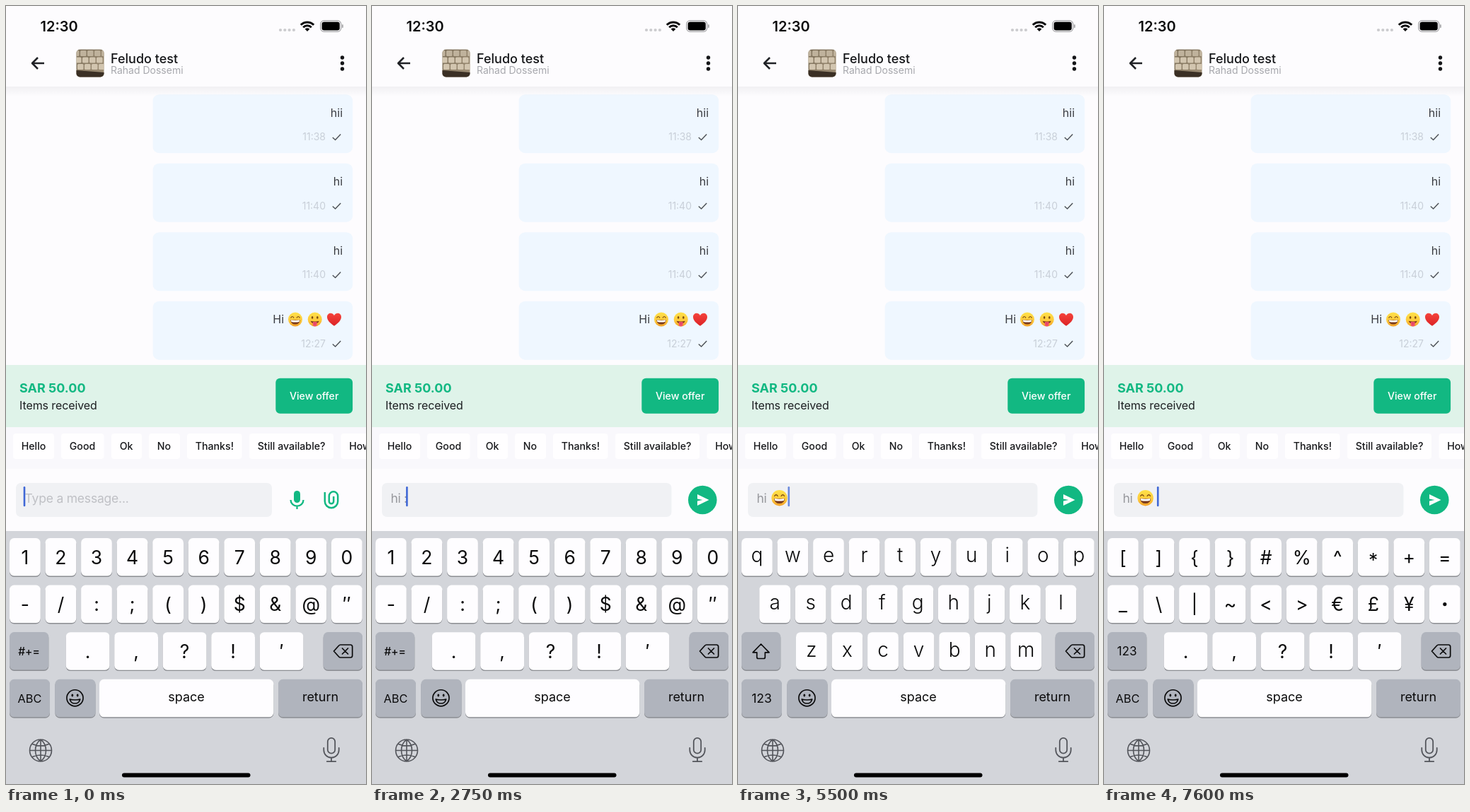
Write an HTML page with a canvas that moves like this. It is 509x1101 px and loops after 8000 ms.

```html
<!DOCTYPE html>
<html lang="en">
<head>
<meta charset="utf-8">
<title>Chat</title>
<style>
html, body { margin: 0; width: 100%; height: 100%; overflow: hidden; background: #fdfcfe; }
canvas { display: block; width: 509px; height: 1101px; }
</style>
</head>
<body>
<canvas id="stage"></canvas>
<script>
const W = 509, H = 1101, LOOP = 8000, STEP = 50;
const GREEN = '#12b882', PAPER = '#fdfcfe', GREY_KEY = '#b0b4bd', BLACK = '#0b0b0c';
const canvas = document.getElementById('stage');
const dpr = window.devicePixelRatio || 1;
canvas.width = W * dpr;
canvas.height = H * dpr;
const c = canvas.getContext('2d');

// Timeline: each entry holds from its time on.
const DRAFT = [[0, ''], [350, 'hi '], [2700, 'hi :'], [5000, 'hi ☺'], [5800, 'hi ☺ ']];
const LAYOUT = [[0, 'digits'], [3550, 'lower'], [4200, 'upper'], [5000, 'lower'], [6200, 'digits'], [7500, 'symbols']];
const PRESSED = [[0, ''], [2500, ':'], [2700, ''], [4800, 'D'], [5000, ''], [5650, 'space'], [5800, '']];
// time, target opacity, fade length
const CARET = [
  [0, 1, 50], [700, 0, 200], [1150, 1, 150], [1700, 0, 200], [2050, 1, 200],
  [3200, 0, 200], [3500, 1, 100], [4150, 0, 200], [4200, 1, 50], [4800, 0, 200],
  [5000, 1, 50], [5500, 0, 200], [5800, 1, 50], [6800, 0, 200], [7100, 1, 200]
];
const CARET_X = { '': 26, 'hi ': 44.6, 'hi :': 49.4, 'hi ☺': 71.8, 'hi ☺ ': 76.2 };
const ROWS = {
  digits: ['1234567890', '-/:;()$&@″', '.,?!′'],
  symbols: ['[]{}#%^*+=', '_\\|~<>€£¥•', '.,?!′'],
  lower: ['qwertyuiop', 'asdfghjkl', 'zxcvbnm'],
  upper: ['QWERTYUIOP', 'ASDFGHJKL', 'ZXCVBNM']
};

const entry = (list, t) => list.filter(e => e[0] <= t).pop();
const at = (list, t) => entry(list, t)[1];
const ease = k => k * k * (3 - 2 * k);

function text(s, x, y, size, color, { weight = 400, align = 'left', spacing = 0 } = {}) {
  c.font = `${weight} ${size}px Inter, "Liberation Sans", sans-serif`;
  c.letterSpacing = spacing + 'px';
  c.textAlign = align;
  c.fillStyle = color;
  c.fillText(s, x, y);
}

function box(x, y, w, h, r, color) {
  c.beginPath();
  c.roundRect(x, y, w, h, r);
  c.fillStyle = color;
  c.fill();
}

function disc(x, y, rx, color, ry = rx) {
  c.beginPath();
  c.ellipse(x, y, rx, ry, 0, 0, 7);
  c.fillStyle = color;
  c.fill();
}

function stroke(path, color, width, cap = 'round') {
  c.strokeStyle = color;
  c.lineWidth = width;
  c.lineCap = cap;
  c.lineJoin = 'round';
  c.stroke(new Path2D(path));
}

function fill(path, color) {
  c.fillStyle = color;
  c.fill(new Path2D(path));
}

function placed(x, y, scale, draw) {
  c.save();
  c.translate(x, y);
  c.scale(scale, scale);
  draw();
  c.restore();
}

// Emoji, drawn in a unit of radius 10
function faceBase() {
  const g = c.createLinearGradient(0, -10, 0, 10);
  g.addColorStop(0, '#ffe14a');
  g.addColorStop(0.6, '#fdc93a');
  g.addColorStop(1, '#f3a02b');
  disc(0, 0, 10, g);
}

function grin() {
  faceBase();
  stroke('M-6.2 -2.4Q-4.2 -5.6 -2.2 -2.4M2.2 -2.4Q4.2 -5.6 6.2 -2.4', '#7a4a12', 1.2);
  fill('M-6.8 .4Q0 1.6 6.8 .4Q6.2 7 0 7Q-6.2 7 -6.8 .4Z', '#7a3a1c');
  fill('M-6.3 .8Q0 2 6.3 .8L5.5 3.4Q0 4.4 -5.5 3.4Z', '#fff');
}

function tongue() {
  faceBase();
  disc(-3.6, -2.6, 1.3, '#7a4a12', 1.8);
  disc(3.6, -2.6, 1.3, '#7a4a12', 1.8);
  fill('M-6 2.2Q0 3.8 6 2.2Q4.6 6 0 6Q-4.6 6 -6 2.2Z', '#7a3a1c');
  box(-2.9, 3.6, 5.8, 6.2, [1, 1, 2.9, 2.9], '#f0506e');
  stroke('M0 4.4V7', '#c93553', 0.7);
}

function heart() {
  const g = c.createLinearGradient(0, -9, 0, 9);
  g.addColorStop(0, '#f5443c');
  g.addColorStop(1, '#dc2326');
  fill('M0 9.3C-7 4.5 -10 .8 -10 -3.4C-10 -9.6 -2.6 -10.8 0 -5.6C2.6 -10.8 10 -9.6 10 -3.4C10 .8 7 4.5 0 9.3Z', g);
}

function statusBar() {
  text('12:30', 48.5, 36, 20, BLACK, { weight: 600 });
  for (let i = 0; i < 4; i++) disc(388 + i * 6.3, 34, 2.1, '#cbcbce');
  for (const r of [13, 8.2]) {
    c.beginPath();
    c.arc(426, 36, r, -Math.PI * 0.75, -Math.PI * 0.25);
    c.strokeStyle = BLACK;
    c.lineWidth = 3;
    c.lineCap = 'butt';
    c.stroke();
  }
  fill('M426 36L422.6 32.6Q426 30 429.4 32.6Z', BLACK);
  c.beginPath();
  c.roundRect(444.7, 20.7, 29, 15.6, 5);
  c.strokeStyle = '#a6a6a9';
  c.lineWidth = 1.3;
  c.stroke();
  box(446.6, 22.6, 25.2, 11.8, 3.2, '#000');
  box(475, 26, 1.8, 5, 1, '#a6a6a9');
}

function avatar() {
  c.save();
  c.beginPath();
  c.roundRect(99.5, 61.5, 39, 39, 5);
  c.clip();
  const g = c.createLinearGradient(99, 61, 139, 101);
  g.addColorStop(0, '#786b55');
  g.addColorStop(1, '#a3937a');
  c.fillStyle = g;
  c.fillRect(99, 61, 40, 40);
  for (let row = 0; row < 3; row++) {
    for (let i = 0; i < 5; i++) box(95 + i * 10 + row * 3, 63 + row * 9.5, 8.6, 8, 1.5, row ? '#d2c5af' : '#bfb29c');
  }
  fill('M99 91L139 94V101H99Z', '#3a2f24');
  c.restore();
}

function header() {
  c.fillStyle = PAPER;
  c.fillRect(0, 0, W, 114);
  const g = c.createLinearGradient(0, 114, 0, 128);
  g.addColorStop(0, 'rgba(20,20,40,.05)');
  g.addColorStop(1, 'rgba(20,20,40,0)');
  c.fillStyle = g;
  c.fillRect(0, 114, W, 14);
  statusBar();
  stroke('M54 81H37.5M45 73L37 81L45 89', '#202226', 2.5, 'butt');
  avatar();
  text('Feludo test', 148, 81, 18, '#141518', { weight: 500 });
  text('Rahad Dossemi', 148, 96.3, 14, '#a7a8ad');
  for (const y of [73, 81, 89]) disc(475.5, y, 2.7, '#141518');
}

function messages() {
  const list = [['hii', '11:38'], ['hi', '11:40'], ['hi', '11:40'], ['Hi', '12:27']];
  list.forEach(([msg, time], i) => {
    const y = 125.2 + i * 97.5;
    const last = i === 3;
    box(207.6, y, 282.6, 83, 9, '#eff7ff');
    text(msg, last ? 393 : 476, y + 31.5, 16, '#3b3d42', { align: 'right' });
    text(time, 452, y + 65, 14, '#c8cfd8', { align: 'right' });
    placed(467.6, y + 60.2, 1, () => stroke('M-5.8 .6L-2 4.2L5.6 -4', '#4d5157', 1.4, 'butt'));
    if (last) {
      placed(409, y + 25.8, 1, grin);
      placed(436.7, y + 25.8, 1, tongue);
      placed(464, y + 25.8, 1, heart);
    }
  });
}

function offer() {
  c.fillStyle = '#dff3e9';
  c.fillRect(0, 508, W, 88);
  text('SAR 50.00', 19, 547, 18, GREEN, { weight: 700 });
  text('Items received', 19, 570.5, 16, '#1d1f22', { spacing: -0.1 });
  box(381.3, 526.7, 108.8, 50, 6, GREEN);
  text('View offer', 435.7, 556.5, 14.2, '#fff', { weight: 500, align: 'center' });
}

function chips() {
  c.fillStyle = '#f9f8fc';
  c.fillRect(0, 596, W, 59);
  const list = [['Hello', 10, 58], ['Good', 78, 60.5], ['Ok', 149, 43], ['No', 202, 44],
    ['Thanks!', 256, 77.5], ['Still available?', 344, 119], ['How', 473.5, 60]];
  for (const [label, x, w] of list) {
    box(x, 605, w, 36, 4, '#fffeff');
    text(label, x + 11.7, 628, 14.2, '#16171a', { weight: 450 });
  }
}

function composer(t, draft) {
  const k = ease(Math.max(0, Math.min(1, (t - 300) / 350)));
  c.fillStyle = PAPER;
  c.fillRect(0, 655, W, 88);
  box(14, 675, 362 + 47.5 * k, 48, 7, '#f0f1f4');

  c.globalAlpha = 1 - k;
  box(407, 686, 9, 17, 4.5, GREEN);
  stroke('M402.5 699A8.8 8.4 0 0 0 420.5 699M411.5 707.5V712', GREEN, 2.3, 'butt');
  stroke('M450.8 688V701A9.2 9.2 0 0 0 469.2 701V693.5A6.2 6.2 0 0 0 456.8 693.5V701A3.2 3.2 0 0 0 463.2 701V694', GREEN, 2.5, 'butt');
  c.globalAlpha = k;
  disc(467.3, 699, 20.3, GREEN);
  fill('M460 691L476.5 699L460 707V700.6L467.5 699L460 697.4Z', '#fff');
  c.globalAlpha = 1;

  if (!draft) {
    text('Type a message...', 26.5, 702.5, 17.5, '#bfc0c5', { spacing: -0.2 });
  } else {
    text(draft.replace('☺', ''), 26.5, 702.5, 17.5, '#96979c', { spacing: -0.3 });
    if (draft.includes('☺')) placed(58.6, 696.2, 1.12, grin);
  }

  const [start, target, length] = entry(CARET, t);
  const f = Math.min(1, (t - start + STEP) / length);
  c.globalAlpha = target ? f : 1 - f;
  box(CARET_X[draft] - 1.3, 680, 2.6, 28.3, 1.3, '#3f67d6');
  c.globalAlpha = 1;
}

function key(x, y, w, color = '#fefdff') {
  box(x, y + 1.4, w, 53.5, 6.5, '#8b8d92');
  box(x, y, w, 53.5, 6.5, color);
}

function glyph(ch, x, y, letters) {
  if (ch === '•') return disc(x, y + 27, 2.6, BLACK);
  const shift = ch === '*' ? 4 : 0;
  const lower = ch >= 'a' && ch <= 'z';
  text(ch, x, y + (letters ? 34.3 : 36.6) + shift, lower ? 28 : 26.5, BLACK,
    { align: 'center', weight: letters ? 300 : 400 });
}

// Enlarged label above a held key
function balloon({ ch, x, y, w }) {
  const l = x - 14, r = x + w + 14, top = y - 68, b = y + 53.5, e = x + w;
  c.save();
  c.shadowColor = 'rgba(0,0,0,.3)';
  c.shadowBlur = 5;
  fill(`M${l + 12} ${top}H${r - 12}Q${r} ${top} ${r} ${top + 12}V${y - 18}C${r} ${y - 4} ${e} ${y - 6} ${e} ${y + 10}` +
    `V${b - 6}Q${e} ${b} ${e - 6} ${b}H${x + 6}Q${x} ${b} ${x} ${b - 6}V${y + 10}C${x} ${y - 6} ${l} ${y - 4} ${l} ${y - 18}` +
    `V${top + 12}Q${l} ${top} ${l + 12} ${top}Z`, '#fefdff');
  c.restore();
  text(ch, x + w / 2, y - 22, 41, BLACK, { align: 'center', weight: 300 });
}

function smileyKey() {
  stroke('M-11 0A11 11 0 1 0 11 0A11 11 0 1 0 -11 0', BLACK, 1.6);
  disc(-3.5, -3.6, 1.3, BLACK, 2);
  disc(3.5, -3.6, 1.3, BLACK, 2);
  stroke('M-7 1.6Q0 3.4 7 1.6Q5.6 7.4 0 7.4Q-5.6 7.4 -7 1.6Z', BLACK, 1.4);
}

function dock() {
  placed(49, 1053.5, 1, () => {
    stroke('M-15.5 0A15.5 15.5 0 1 0 15.5 0A15.5 15.5 0 1 0 -15.5 0M0 -15.5V15.5M-15.5 0H15.5' +
      'M0 -15.5C-10 -8 -10 8 0 15.5M0 -15.5C10 -8 10 8 0 15.5M-11.5 -9Q0 -4 11.5 -9M-11.5 9Q0 4 11.5 9', '#53555b', 1.6);
  });
  placed(460, 1053, 1.04, () => {
    stroke('M-5 -11.5A5 5 0 0 1 5 -11.5V-.5A5 5 0 0 1 -5 -.5ZM-10.3 -3V0A10.3 10.3 0 0 0 10.3 0V-3M0 10.3V15.5M-6 15.5H6', '#53555b', 1.7);
  });
  box(164, 1085.4, 181.5, 6, 3, '#000');
}

function keyboard(mode, pressed) {
  const letters = mode === 'lower' || mode === 'upper';
  let held = null;
  c.fillStyle = '#d3d5da';
  c.fillRect(0, 743, W, H - 743);

  ROWS[mode].forEach((row, r) => {
    const y = 753 + r * 66.6;
    const wide = r === 2 && !letters;
    const x0 = r === 2 ? (letters ? 82 : 84.7) : (r === 1 && letters ? 30.2 : 5);
    [...row].forEach((ch, i) => {
      const x = x0 + i * (wide ? 68.5 : 50.55), w = wide ? 61.8 : 43.8;
      key(x, y, w);
      glyph(ch, x + w / 2, y, letters);
      if (ch === pressed) held = { ch, x, y, w };
    });
  });

  const y3 = 886, y4 = 952.8, mid = { align: 'center' };
  key(5, y3, 55.3, mode === 'upper' ? '#fefdff' : GREY_KEY);
  if (letters) {
    const arrow = 'M32.5 903L44 914.8H38.3V921.5Q38.3 923.5 36.3 923.5H28.7Q26.7 923.5 26.7 921.5V914.8H21Z';
    if (mode === 'upper') fill(arrow, BLACK);
    stroke(arrow, BLACK, 1.7);
  } else if (mode === 'digits') {
    text('#+=', 32.5, 919, 15.5, BLACK, { weight: 500, align: 'center' });
  } else {
    text('123', 32.5, 919.3, 17, BLACK, mid);
  }
  key(448.7, y3, 55.3, GREY_KEY);
  stroke('M463.5 913L470.5 905.2Q471.5 904 473 904H487Q489.7 904 489.7 906.7V919.3Q489.7 922 487 922H473Q471.5 922 470.5 920.8Z' +
    'M475.5 909L483.5 917M483.5 909L475.5 917', BLACK, 1.7);

  key(5, y4, 57, GREY_KEY);
  text(letters ? '123' : 'ABC', 33.5, 985.5, letters ? 17.5 : 16.3, BLACK, mid);
  key(69.5, y4, 57, GREY_KEY);
  placed(97.5, 979.3, 1.05, smileyKey);
  key(132, y4, 246.3, pressed === 'space' ? GREY_KEY : '#fefdff');
  text('space', 255, 984.3, 18, BLACK, mid);
  key(385, y4, 119, GREY_KEY);
  text('return', 444.5, 984.3, 18, BLACK, mid);
  dock();
  if (held) balloon(held);
}

function render(t) {
  c.setTransform(dpr, 0, 0, dpr, 0, 0);
  c.fillStyle = PAPER;
  c.fillRect(0, 0, W, H);
  messages();
  header();
  offer();
  chips();
  composer(t, at(DRAFT, t));
  keyboard(at(LAYOUT, t), at(PRESSED, t));
}

const begin = performance.now();
function tick() {
  const t = (performance.now() - begin) % LOOP;
  render(Math.floor(t / STEP) * STEP);
  requestAnimationFrame(tick);
}
tick();
</script>
</body>
</html>
```
